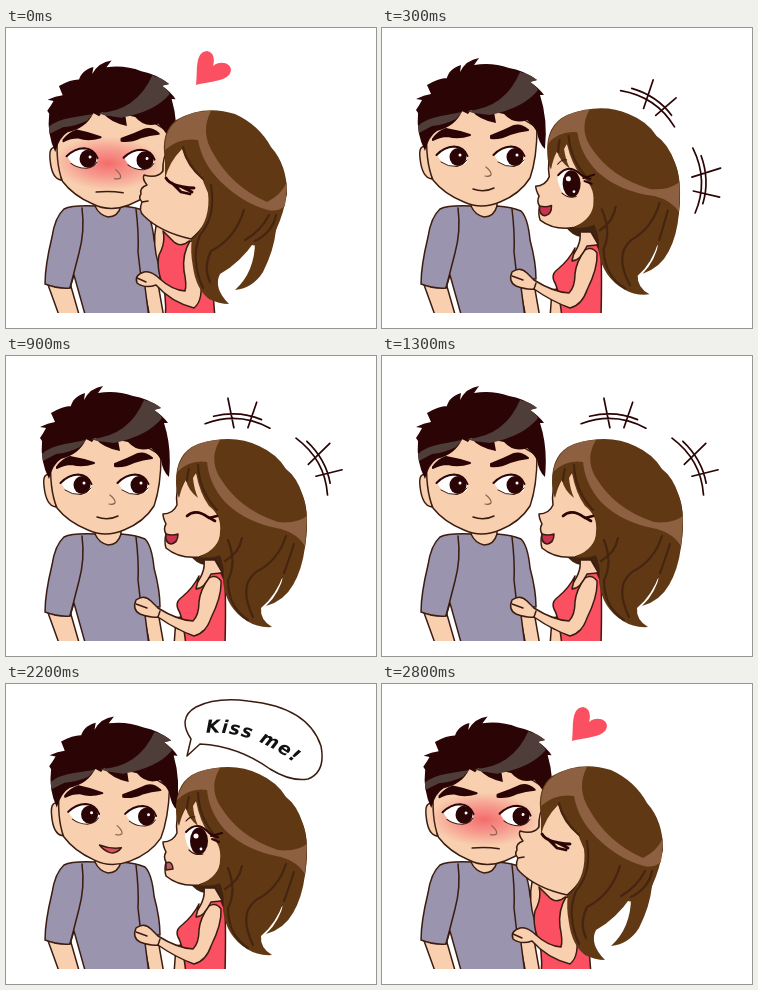
An HTML page that plays this animation: 370x300 px, repeating every 3.1 s.

```html
<!DOCTYPE html>
<html lang="en">
<head>
<meta charset="utf-8">
<title>Kiss me</title>
<style>
  html, body { margin: 0; width: 100%; height: 100%; overflow: hidden; background: #fff; }
  svg { display: block; width: 100vw; height: 100vh; }
  .line { fill: none; }
  .ink, .line, .skin, .shirt, .dress { stroke: #3b1c10; stroke-width: 1.5; stroke-linejoin: round; stroke-linecap: round; }
  .skin { fill: #f8d0b0; }
  .shirt { fill: #9a94ae; }
  .dress { fill: #fb5062; }
  .dark { fill: #2b0405; }
  .gray { fill: #4e3d38; }
  .brown { fill: #603813; }
  .shade { fill: #412312; }
  .light { fill: #8c6040; }
  .deep { fill: none; stroke: #452512; stroke-width: 2.2; stroke-linecap: round; }
  .red { fill: #fb5062; }
  .white { fill: #fff; }
  .lash { fill: none; stroke: #2b0405; stroke-width: 2.6; stroke-linecap: round; stroke-linejoin: round; }
  text { font: italic 700 18px "DejaVu Sans", "Open Sans", sans-serif; letter-spacing: 1.2px; fill: #111; }
</style>
</head>
<body>
<svg viewBox="0 0 370 300">
  <defs>
    <clipPath id="floor"><rect width="370" height="285"/></clipPath>
    <radialGradient id="flush">
      <stop offset="0" stop-color="#f4525a" stop-opacity=".8"/>
      <stop offset=".5" stop-color="#f4626a" stop-opacity=".5"/>
      <stop offset="1" stop-color="#f4626a" stop-opacity="0"/>
    </radialGradient>
    <path id="textLine" d="M200 49Q253 45 304 92"/>
    <g id="mark" class="line" style="stroke:#2b0405;stroke-width:1.7">
      <path d="M-33 0Q0-15 32 0M-25-8Q0-16 23-8M-12-27L-4 2M17-25L10 1"/>
    </g>
    <g id="eye">
      <path class="white" d="M-15-3Q-5-13 10-9Q17-4 15 5Q8 11-3 9Q-12 6-15-3Z"/>
      <ellipse class="dark" cx="6" cy="0" rx="8.5" ry="9"/>
      <circle class="white" cx="8" cy="-2" r="1.5"/>
      <path class="line" d="M-11 5Q-4 10 5 9.5Q12 8 15 3" style="stroke-width:1"/>
      <path class="lash" d="M-15.5-2Q-8-10 2-10.5Q12-10 15.5-1" style="stroke-width:2"/>
    </g>
  </defs>

  <g clip-path="url(#floor)">
    <g id="manBody">
      <path class="skin" d="M41 254L54 290H74L64 255Z"/>
      <path class="skin" d="M136 250L144 290H158L151 250Z"/>
      <path class="skin" d="M89 165V182Q102 198 115 182V165Z"/>
      <path class="shirt" d="M89 178Q66 177 58 181Q49 189 46 209Q39 238 39 256Q52 261 64 260L68 247L80 290H143L138 251L154 251Q154 234 148 212Q146 190 139 183Q130 179 115 178Q112 189 102 189Q93 187 89 178Z"/>
      <path class="line" d="M76 180Q79 203 73 225L64 260M130 181Q133 206 132 224L135 250"/>
    </g>

    <g id="manHead">
      <path class="skin" d="M47 119Q36 115 38 130Q40 150 50 151Z"/>
      <path class="skin" d="M45 100Q43 133 51 152Q62 166 82 174Q99 182 118 174Q138 166 148 150Q155 130 155 100Q100 60 45 100Z"/>
      <ellipse class="blush" cx="96" cy="133" rx="55" ry="27" fill="url(#flush)"/>
      <path class="dark" d="M43 123Q34 105 36 85L34 82Q38 76 40 72L34 71Q42 67 49 66L45 57Q57 50 65 50L64 55Q65 41 79 37L78 44Q84 32 97 30L92 37Q110 34 127 40Q141 42 155 52L148 54Q157 60 162 67L158 67Q166 91 163 121Q157 116 155 104Q151 97 145 92Q132 97 122 86L112 84L114 95Q97 92 89 82L86 86L80 83Q74 98 55 103Q47 108 43 123Z"/>
      <path class="gray" d="M36 98Q43 91 59 88L80 84L74 91Q62 97 50 98L37 105Z M85 83Q123 80 138 44Q148 46 155 52L148 54Q154 58 156 62Q142 80 108 87L91 85Z"/>
      <path class="dark" d="M51 111Q56 104 64 101Q76 103 88 107Q76 111 66 108Q58 108 51 112Z M109 108Q122 103 132 98Q139 96 146 102Q137 103 128 106Q118 111 109 110Z" stroke="#2b0405" stroke-width="2" stroke-linejoin="round"/>
      <use href="#eye" x="70" y="129"/>
      <use href="#eye" x="127" y="129"/>
      <path class="line" d="M104 139Q110 144 109 147Q107 149 103 148" style="stroke:#8b6150;stroke-width:1.2"/>
      <path class="line smile" d="M91 161Q102 165 112 160"/>
      <path class="line flat" d="M85 162Q98 160 112 162"/>
      <path class="ink wide" fill="#b83d3f" d="M84 158Q96 161 109 159Q106 169 97 168Q88 166 84 158Z"/>
      <path class="ink speak" fill="#d9525a" d="M87 159Q98 163 109 161Q104 168 97 166Q91 164 87 159Z"/>
    </g>

    <g class="upright">
      <path class="shade" d="M182 197L217 184L224 240L207 222L199 209Q190 208 182 197Z"/>
      <path class="skin" d="M170 262L168 290H190V258Z"/>
      <path class="skin" d="M198 204Q200 217 187 232L200 234L216 216L209 204Z"/>
      <path class="dress" d="M193 220Q187 232 176 241Q169 246 172 253Q177 261 180 290H219Q220 250 219 226L215 217L205 218Q198 233 190 233Z"/>
      <path class="skin" d="M203 222Q194 234 193 246Q193 259 187 265Q171 264 152 252L145 245Q138 238 130 244Q126 254 134 258Q145 262 152 261Q169 273 188 280Q200 277 205 262Q216 240 215 225Q210 218 203 222Z"/>
      <path class="line" d="M130 248L141 252M152 261L154 255"/>

      <g id="girlHead">
        <path class="brown" d="M205 185Q221 205 217 226Q220 252 241 265Q252 272 266 271Q254 264 255 252Q270 240 278 217Q274 237 260 250Q278 245 287 229Q296 214 299 191Q305 150 292 130L230 130Z"/>
        <path class="skin" d="M176 115Q169 135 171 149Q167 158 157 158Q157 162 160 168Q157 173 160 178Q158 186 160 192Q173 203 193 201Q211 196 218 181L215 120Z"/>
        <path class="brown" d="M170 127Q169 97 192 88Q227 77 253 90Q271 98 280 113Q291 121 297 140Q304 158 299 191Q291 215 272 225Q249 240 231 227Q216 214 218 197Q208 203 193 201Q214 192 214 176Q216 160 203 150Q194 138 190 117L187 122Q188 133 192 142Q182 134 180 124Q176 130 173 142Q170 136 170 127Z"/>
        <path class="light" d="M171 116Q176 94 193 88Q203 84 214 84Q203 102 213 120Q232 153 272 166Q290 168 301 160L299 190Q292 178 275 173Q240 167 219 146Q203 128 201 106Q184 103 171 116Z"/>
        <path class="deep" d="M192 109Q193 135 211 154M183 113Q181 119 181 125M222 184Q231 207 222 224Q222 251 242 264M280 180Q272 205 250 216Q232 230 247 261M288 188Q281 209 278 217M236 182Q233 197 219 205"/>
        <g class="open">
          <path class="white" d="M179 151Q181 144 190 142L200 148Q203 168 193 170Q181 169 179 151Z"/>
          <ellipse class="dark" cx="193" cy="157" rx="9" ry="13.5"/>
          <circle class="white" cx="190" cy="152" r="2.5"/>
          <circle class="white" cx="195" cy="165" r="1.4"/>
          <path class="lash" d="M180 148Q190 137 200 146Q206 152 212 153M205 152L216 149M206 155L213 158" style="stroke-width:2"/>
          <path class="line" d="M180 137Q184 132 189 133M183 166Q189 172 197 170" style="stroke-width:1.2"/>
        </g>
        <path class="lash closed" d="M181 160Q190 152 203 162L211 160M202 161L209 165"/>
        <path class="ink laugh" fill="#c93250" d="M160 178Q166 180 172 178Q172 187 165 188Q159 187 160 178Z"/>
        <path class="ink worry" fill="#b7606a" d="M160 179Q166 176 167 185L160 186Z"/>
      </g>
    </g>

    <g class="kiss">
      <path class="skin" d="M150 198Q146 216 153 238L163 262L186 245V198Z"/>
      <path class="dress" d="M157 203Q160 214 153 227Q150 240 157 257Q161 272 159 290H209L205 240L183 213Q174 221 166 212Q162 208 157 203Z"/>
      <path class="skin" d="M184 213Q176 226 178 243Q181 257 179 263Q166 262 154 251Q145 242 138 244Q128 247 131 255Q139 261 150 257Q165 274 188 280Q198 272 194 249L195 215Z"/>
      <path class="line" d="M131 250L140 254"/>
      <path class="brown" d="M195 185Q181 208 187 239Q190 261 203 271Q213 276 223 276Q207 260 214 246Q234 235 249 213Q249 244 229 262Q247 260 257 244Q268 222 270 202L281 166Q262 130 195 185Z"/>
      <path class="skin" d="M164 116Q156 130 157 143Q151 151 138 147Q136 151 141 157Q133 160 135 166Q132 170 136 174Q132 183 138 188Q154 204 185 211Q202 198 207 175L197 118Z"/>
      <path class="brown" d="M159 131Q154 105 170 92Q198 76 229 86Q253 97 265 119Q281 137 281 165Q278 185 270 202Q262 223 242 216Q218 239 200 237Q183 231 189 209Q205 190 202 165Q193 146 190 123Q193 138 196 151Q181 139 176 121Q163 134 159 151Z"/>
      <path class="light" d="M159 122Q158 98 177 89Q190 82 205 83Q194 104 207 125Q225 158 261 174Q275 167 281 154L279 178Q272 184 262 182Q236 175 214 153Q196 135 192 112Q173 109 159 122Z"/>
      <path class="deep" d="M177 119Q181 137 197 151M205 157Q210 189 194 207Q184 231 197 260M238 182Q229 211 205 223Q197 239 204 254M270 187Q267 204 249 213M263 187Q255 203 239 212"/>
      <path class="lash" d="M160 150Q165 159 188 160M166 155L175 164L184 166M174 158L186 164" style="stroke-width:2.8"/>
      <path class="line" d="M136 174L142 173"/>
    </g>
  </g>

  <path id="heart" class="red" d="M190 57C192 45 188 24 201 23C208 24 209 32 207 38C214 32 225 35 225 42C224 54 203 53 190 57Z"/>
  <g id="marks"><use href="#mark"/><use href="#mark"/></g>
  <g class="bubble">
    <path class="ink white" d="M181 72L185 55Q171 34 190 23Q210 13 242 17Q302 23 315 62Q320 88 302 95Q285 98 264 85Q232 62 194 60Z"/>
    <text><textPath href="#textLine">Kiss<tspan class="me"> me!</tspan></textPath></text>
  </g>
</svg>
<script>
const LOOP = 3100;
const MAN_LEFT = "";
const MAN_RIGHT = "translate(7.5 2.5) rotate(2 100 130)";
const MAN_KISSED = "translate(6 2.5) rotate(1.5 100 130)";
const FORWARD = "translate(-2 -3) rotate(-2.5 230 190)";

// Each burst: x, y and angle of the two groups of laughter strokes.
const BURST_LOW = [[266, 81, 34], [312, 153, 88]];
const BURST_HIGH = [[232, 70, 4], [306, 111, 61]];
const BURST_MID = [[250, 75, 19], [309, 132, 75]];

const look = { man: MAN_LEFT, girl: "", heart: "", burst: null };
const closed = { ...look, show: "upright smile closed laugh", burst: BURST_HIGH };
const near = { ...look, show: "upright smile open laugh", girl: FORWARD, burst: BURST_LOW };
const back = { ...near, girl: "", burst: BURST_MID };
const turned = { ...look, show: "upright smile open laugh", man: MAN_RIGHT };
const ask = { ...turned, show: "upright wide open worry bubble" };
const asked = { ...turned, show: "upright speak open worry bubble me" };
const kissed = { ...look, show: "kiss flat blush heart", man: MAN_KISSED };
const kissing = { ...kissed, heart: "translate(0 -6)" };

const timeline = [
  [0, kissed], [100, closed], [300, near], [500, closed], [700, near], [900, closed],
  [1100, back], [1300, closed], [1500, back], [1700, turned],
  [1900, ask], [2200, asked], [2500, kissing], [2800, kissed]
];

const $ = id => document.getElementById(id);
const parts = ["upright", "kiss", "smile", "flat", "wide", "speak", "open", "closed", "laugh", "worry", "blush", "bubble", "me"];
let current;

function draw(state) {
  const shown = state.show.split(" ");
  for (const name of parts) {
    for (const part of document.querySelectorAll("." + name)) part.style.display = shown.includes(name) ? "" : "none";
  }
  $("manHead").setAttribute("transform", state.man);
  $("girlHead").setAttribute("transform", state.girl);
  $("heart").setAttribute("transform", state.heart);
  $("heart").style.display = shown.includes("heart") ? "" : "none";
  $("marks").style.display = state.burst ? "" : "none";
  (state.burst || []).forEach(([x, y, angle], i) =>
    $("marks").children[i].setAttribute("transform", `translate(${x} ${y}) rotate(${angle})`));
}

function tick() {
  const time = performance.now() % LOOP;
  const state = timeline.filter(([start]) => start <= time).pop()[1];
  if (state !== current) draw(current = state);
  requestAnimationFrame(tick);
}
tick();
</script>
</body>
</html>
```
